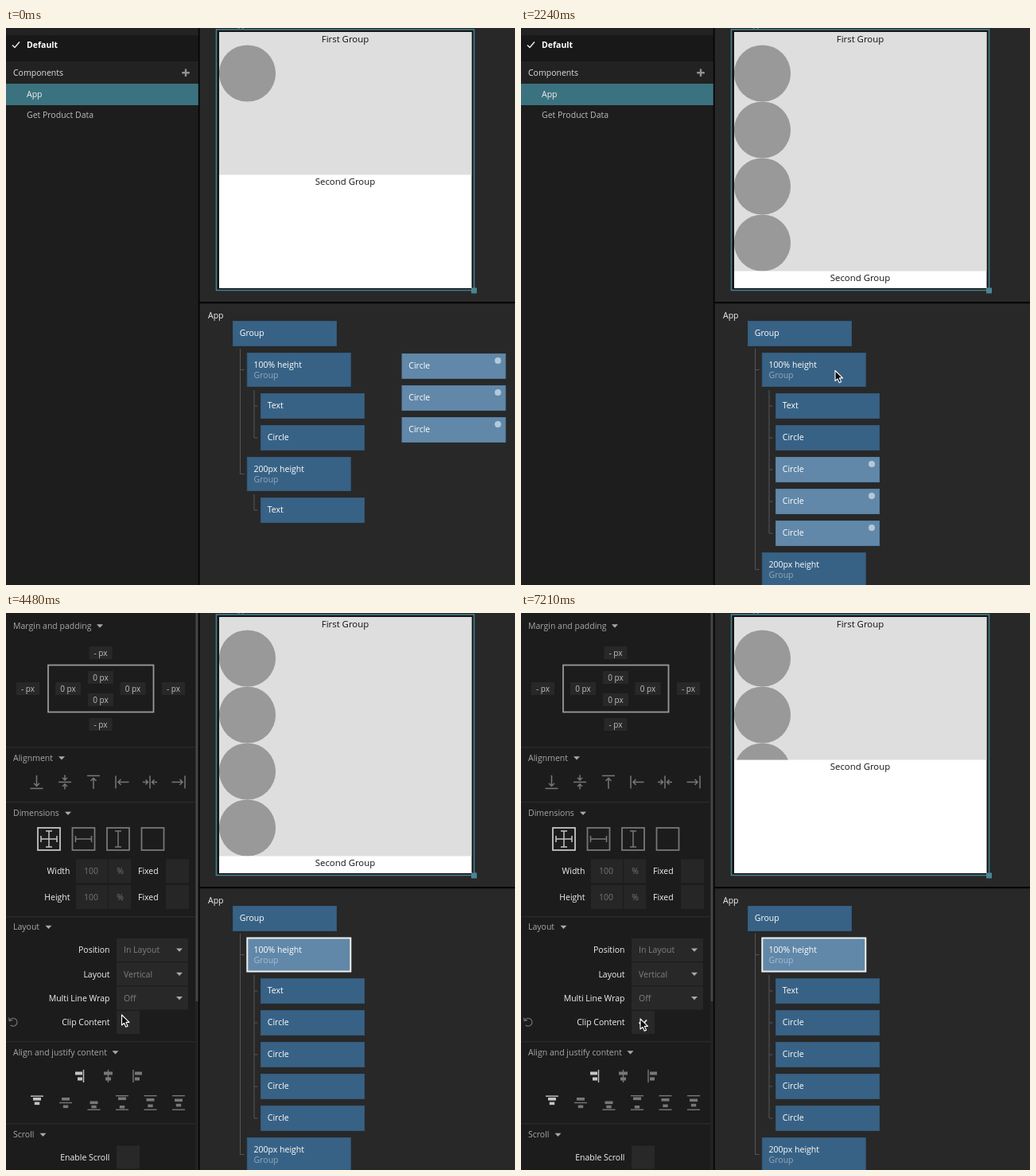
An HTML page that plays this animation: 640x700 px, repeating every 7.28 s.

```html
<!DOCTYPE html>
<html lang="en">
<head>
<meta charset="utf-8">
<title>Node editor: clip content</title>
<style>
html, body { margin: 0; width: 100%; height: 100%; overflow: hidden; background: #282828; }
svg { display: block; width: 640px; height: 700px; }
text { font: 10.5px "Open Sans", "Noto Sans", sans-serif; white-space: pre; }
</style>
</head>
<body>
<svg id="stage" viewBox="0 0 640 700" width="640" height="700"></svg>
<script>
const LOOP = 7280, STEP = 70;
const PRESS = 630, DROP = 1820, HOVER = 2380, SELECT = 3080, CHECK = 5320;
const svg = document.getElementById('stage');

function el(parent, tag, attrs = {}) {
  const e = document.createElementNS('http://www.w3.org/2000/svg', tag);
  for (const k in attrs) e.setAttribute(k, attrs[k]);
  parent.appendChild(e);
  return e;
}
const group = (p, attrs) => el(p, 'g', attrs);
const rect = (p, x, y, width, height, fill, more) => el(p, 'rect', { x, y, width, height, fill, ...more });
const circle = (p, cx, cy, r, fill, more) => el(p, 'circle', { cx, cy, r, fill, ...more });
const path = (p, d, stroke, width = 1, more) =>
  el(p, 'path', { d, stroke, 'stroke-width': width, fill: 'none', ...more });
// y is the vertical middle of the line of text
function label(p, str, x, y, fill = '#f2f2f2', anchor = 'start', style = '') {
  const e = el(p, 'text', { x, y: y + 3.9, fill, 'text-anchor': anchor, style });
  e.textContent = str;
  return e;
}
const show = (e, on) => e.setAttribute('display', on ? 'inline' : 'none');
const move = (e, x, y) => e.setAttribute('transform', `translate(${x} ${y})`);
const triangle = (p, x, y) => path(p, `M${x - 4} ${y - 2}h8l-4 4.2z`, 'none', 0, { fill: '#aaa' });

// Component list
function buildList() {
  const g = group(svg);
  rect(g, 0, 0, 242, 700, '#1d1d1d');
  rect(g, 0, 0, 242, 9, '#222');
  rect(g, 0, 9, 242, 33, '#181818');
  rect(g, 0, 42, 242, 28, '#222');
  rect(g, 0, 70, 242, 27, '#3b727f');
  path(g, 'M8 21.5l3 3 6-7', '#f2f2f2', 1.4);
  label(g, 'Default', 26, 21, '#fff', 'start', 'font-weight:700');
  label(g, 'Components', 9, 56, '#e0e0e0');
  path(g, 'M226 51.5v9.5M221.2 56.2h9.6', '#909090', 2.4);
  label(g, 'App', 26, 83);
  label(g, 'Get Product Data', 26, 109, '#bdbdbd');
  return g;
}

// Property panel
const DIM = '#777', LIT = '#c4c4c4', BOX = '#282828';

function valueBox(g, str, x, y) {
  const w = str === '- px' ? 29 : 32;
  rect(g, x - w / 2, y - 8, w, 16, BOX);
  label(g, str, x, y, '#c0c0c0', 'middle', 'font-size:10px');
}

function alignIcon(g, x, angle, center) {
  const icon = group(g, { transform: `translate(${x} 212.5) rotate(${angle})` });
  const d = center
    ? 'M-8 0h16M0-9v6M-3-5.5l3 3 3-3M0 9v-6M-3 5.5l3-3 3 3'
    : 'M-8 8h16M0-8.5v13M-3.5 1.5l3.5 3.5 3.5-3.5';
  path(icon, d, DIM, 1.5);
}

function sizeIcon(g, x, across, down, color) {
  rect(g, x - 14, 270, 28, 28, 'none', { stroke: color, 'stroke-width': 1.8 });
  if (across) path(g, `M${x - 10} 284h20M${x - 10} 280v8M${x + 10} 280v8`, color, 1.5);
  if (down) path(g, `M${x} 274v20M${x - 4} 274h8M${x - 4} 294h8`, color, 1.5);
}

function barIcon(g, x, lines, top, bottom, color) {
  lines.forEach(y => rect(g, x - 8, 615.5 + y, 16, 1.4, color));
  rect(g, x - 5, 615.5 + top, 10, 3.6, color);
  rect(g, x - 3.2, 615.5 + bottom, 6.4, 3.6, color);
}

function buildPanel() {
  const g = group(svg);
  rect(g, 0, 0, 242, 700, '#1c1c1c');
  rect(g, 238, 0, 4, 700, '#232323');
  rect(g, 238.5, 0, 3, 488, '#454545');
  [168, 237, 381, 538, 641].forEach(y => rect(g, 0, y, 238, 1.5, '#292929'));
  [['Margin and padding', 16, 118], ['Alignment', 182, 70], ['Dimensions', 251.5, 78],
   ['Layout', 394.5, 53.5], ['Align and justify content', 552, 137.5], ['Scroll', 655.5, 46.5]]
    .forEach(([s, y, x]) => { label(g, s, 9, y, '#a8a8a8'); triangle(g, x, y + .3); });

  rect(g, 53, 65.5, 132.5, 59, 'none', { stroke: '#999', 'stroke-width': 1.8 });
  [[119, 50], [27.5, 95], [210.5, 95], [119, 140]].forEach(p => valueBox(g, '- px', ...p));
  [[119, 81], [78, 95], [159.5, 95], [119, 109]].forEach(p => valueBox(g, '0 px', ...p));

  [[38.5, 0], [74, 0, 1], [110, 180], [146, 90], [181, 90, 1], [217, -90]]
    .forEach(a => alignIcon(g, ...a));
  sizeIcon(g, 54, 1, 1, LIT);
  sizeIcon(g, 97.5, 1, 0, DIM);
  sizeIcon(g, 141, 0, 1, DIM);
  sizeIcon(g, 184.5, 0, 0, DIM);

  [['Width', 324.5], ['Height', 357]].forEach(([s, y]) => {
    label(g, s, 80.5, y, '#f2f2f2', 'end');
    rect(g, 88, y - 15, 40, 30, '#262626');
    rect(g, 129, y - 15, 28, 30, '#262626');
    label(g, '100', 107, y, '#757575', 'middle');
    label(g, '%', 143.5, y, '#757575', 'middle');
    label(g, 'Fixed', 166, y);
    rect(g, 201, y - 15, 29, 30, '#262626');
  });

  [['Position', 'In Layout', 423.5], ['Layout', 'Vertical', 453.8], ['Multi Line Wrap', 'Off', 484]]
    .forEach(([s, v, y]) => {
      label(g, s, 130.5, y, '#f2f2f2', 'end');
      rect(g, 139, y - 14.6, 90, 29.2, BOX);
      label(g, v, 148, y, '#808080');
      triangle(g, 218, y);
    });
  [['Clip Content', 514.5], ['Enable Scroll', 684]].forEach(([s, y]) => {
    label(g, s, 130.5, y, '#f2f2f2', 'end');
    rect(g, 139, y - 14.5, 29, 29, BOX);
  });
  path(g, 'M4.5 512a5 5 0 1 1 1.2 6M3.5 508.5l.8 4 4-.8', '#777', 1.1);

  [[92, 5.5, -5, -2, LIT], [128.5, 0, -5.5, -3.5, DIM], [165, -5, -3, -3, DIM]]
    .forEach(([x, line, a, b, c]) => {
      rect(g, x + line - .7, 574, 1.4, 16, c);
      rect(g, x + a, 576.5, line ? 9 : 11, 4, c);
      rect(g, x + b, 583.5, line ? 6 : 7, 4, c);
    });
  [[39, [-9], -6.5, -1, LIT], [75, [-.7], -6.5, 3, DIM], [110.5, [8], -2, 3.3, DIM],
   [146, [-9.5, 8], -7, 3.5, DIM], [181.5, [-9.5, 8], -5.5, 2, DIM], [217, [-9.5, 8], -5, 1.3, DIM]]
    .forEach(a => barIcon(g, ...a));
  return g;
}

// Preview
function buildPreview() {
  const g = group(svg);
  rect(g, 264.5, 2, 324, 327.5, '#151515', { stroke: '#457f8d', 'stroke-width': 1.6 });
  rect(g, 585, 326.5, 7, 7, '#4a8593');
  path(g, 'M291.5 .3h2.5M296.5 .3h2.5', '#457f8d', 1);
  rect(g, 268, 5, 317.5, 322, '#fff');
  const clip = el(el(g, 'defs'), 'clipPath', { id: 'clip' });
  const clipRect = rect(clip, 268, 5, 317.5, 179.5, '#000');
  const first = group(g, { 'clip-path': 'url(#clip)' });
  rect(first, 268, 5, 317.5, 322, '#dedede');
  const balls = [0, 1, 2, 3].map(i => circle(first, 303.5, 57 + 71 * i, 35.6, '#999'));
  label(first, 'First Group', 426.5, 14, '#111', 'middle', 'font-size:11.4px');
  const tint = rect(first, 268, 5, 317.5, 322, 'rgba(155,210,239,.58)');
  const second = group(g);
  label(second, 'Second Group', 426.5, 8.2, '#111', 'middle', 'font-size:11.4px');
  return { clipRect, balls, tint, second };
}

// Node graph
const BLUE = '#386285', LIGHT = '#6188a9';

function node(parent, title, sub) {
  const g = group(parent), h = sub ? 42.5 : 31.5;
  const body = rect(g, .5, .5, 130, h - .5, BLUE, { 'stroke-width': 1 });
  label(g, title, 8.8, 15.5, '#fff', 'start', 'font-weight:500');
  if (sub) label(g, sub, 8.8, 28.5, 'rgba(255,255,255,.45)');
  const dot = circle(g, 121, 9, 4, '#b3c9da');
  const paint = (light, dotted, border, dash) => {
    body.setAttribute('fill', light ? LIGHT : BLUE);
    body.setAttribute('stroke', border || (light ? '#557fa2' : '#33597b'));
    body.setAttribute('stroke-width', border === '#f0f0ea' ? 2 : 1);
    body.setAttribute('stroke-dasharray', dash ? '4 3' : 'none');
    show(dot, dotted);
  };
  paint(false, false);
  return { g, paint };
}
const placed = (title, x, y, sub) => {
  const n = node(svg, title, sub);
  move(n.g, x, y);
  return n;
};

rect(svg, 0, 0, 640, 700, '#282828');
const preview = buildPreview();
rect(svg, 243, 344, 397, 2.2, '#060606');
label(svg, 'App', 254, 361);
const wires = path(svg, '', '#565656', 1);
placed('Group', 285, 368);
const main = placed('100% height', 302.8, 408, 'Group');
placed('Text', 320, 459);
placed('Circle', 320, 499);
const lower = node(svg, '200px height', 'Group');
const lowerText = node(svg, 'Text');
const marker = rect(svg, 320, 532.5, 131, 4.5, '#fff');
const cards = [0, 1, 2].map(() => node(svg, 'Circle'));
const list = buildList();
const panel = buildPanel();
const tick = path(panel, 'M148.5 514.5l3.5 3.8 6-6.8', '#f2f2f2', 1.8);
rect(svg, 241.8, 0, 1.8, 700, '#060606');

const pointer = group(svg);
const ring = group(pointer);
circle(ring, 0, .5, 18.6, 'none', { stroke: 'rgba(255,255,255,.45)', 'stroke-width': 3 });
circle(ring, 0, .5, 18.3, 'none', { stroke: '#111', 'stroke-width': 1.4 });
path(pointer, 'M0 0V13L3 10.3 5.2 15.3 7.6 14.2 5.4 9.4H9.5Z', '#fff', 1.1,
  { fill: '#0c0c0c', 'stroke-linejoin': 'round' });

// Pointer tip: time, x, y
const ROUTE = [
  [70, 584, 500], [560, 545.5, 424], [770, 545.5, 424], [1400, 414, 430], [1750, 395.5, 430],
  [2240, 395, 430.5], [2730, 379, 429.5], [3710, 378.5, 429], [4410, 146, 504.5],
  [4480, 145.5, 505], [5110, 148, 508], [5320, 148, 508], [7210, 150, 510]
];

function pointerAt(t) {
  const i = ROUTE.findIndex(k => k[0] >= t);
  if (i < 0) return ROUTE[ROUTE.length - 1].slice(1);
  if (i === 0) return ROUTE[0].slice(1);
  const [t0, x0, y0] = ROUTE[i - 1], [t1, x1, y1] = ROUTE[i];
  const u = (t - t0) / (t1 - t0), e = u * u * (3 - 2 * u);
  return [x0 + (x1 - x0) * e, y0 + (y1 - y0) * e];
}

function wirePath(shift) {
  const end = 515 + shift;
  let d = `M294.5 403V${560.5 + shift}h5M294.5 429.5h5M312 455V${end}h4.5`;
  for (let y = 475; y < end; y += 40) d += `M312 ${y}h4.5`;
  return d + `M312 ${586 + shift}v20h4.5`;
}

function draw(t) {
  const [px, py] = pointerAt(t);
  const dropped = t >= DROP, selected = t >= SELECT, clipped = t >= CHECK;
  const dragging = t >= PRESS && !dropped;
  const over = t >= HOVER && px > 303 && px < 433 && py > 408 && py < 451;

  show(list, !selected);
  show(panel, selected);
  show(tick, selected && clipped);

  const edge = dropped && !clipped ? 305.5 : 184.5;
  preview.clipRect.setAttribute('height', edge - 5);
  preview.balls.forEach((b, i) => show(b, i === 0 || dropped));
  show(preview.tint, over);
  move(preview.second, 0, edge);

  const shift = dropped ? 120 : 0;
  wires.setAttribute('d', wirePath(shift));
  move(lower.g, 302.8, 539 + shift);
  move(lowerText.g, 320, 590 + shift);
  main.paint(over || selected, over, selected && '#f0f0ea');

  const dx = dragging ? px - 545.5 : 0, dy = dragging ? py - 424 : 0;
  const moved = dragging && dx < 0;
  cards.forEach((c, i) => {
    if (dropped) move(c.g, 320, 539 + 40 * i);
    else move(c.g, 497.5 + dx, 409 + dy + 40 * i);
    c.g.setAttribute('opacity', moved ? .96 : 1);
    c.paint(!selected, !selected, moved && '#7d9fbb', moved);
  });
  show(marker, dragging && px < 470);

  show(pointer, t >= 70);
  move(pointer, px, py);
  show(ring, dragging || (t >= 2870 && t < SELECT) || (t >= 5180 && t < CHECK));
}

const start = performance.now();
function tickFrame() {
  const t = Math.max(0, performance.now() - start) % LOOP;
  draw(Math.floor(t / STEP) * STEP);
  requestAnimationFrame(tickFrame);
}
tickFrame();
</script>
</body>
</html>
```
